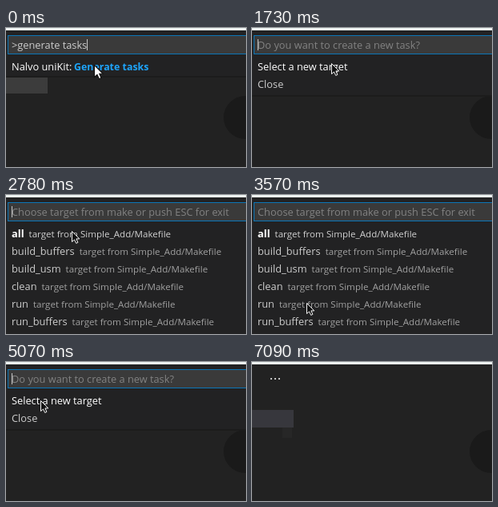
An HTML page with a canvas that plays this animation: 300 px wide and 174 px high, repeating every 7620 ms.

```html
<!DOCTYPE html>
<html lang="en">
<head>
<meta charset="utf-8">
<title>Command palette</title>
<style>
html, body { margin: 0; overflow: hidden; background: #222; }
canvas { display: block; }
</style>
</head>
<body>
<canvas id="stage" width="300" height="174"></canvas>
<script>
const ctx = document.getElementById('stage').getContext('2d');
const LOOP = 7620;
const TICK = 131;
const FONT = '"Open Sans", "Noto Sans", sans-serif';

// The caret toggles every `blink` ms; at `click` the given row takes the focus.
const scenes = [
  { start: 0, draw: command, blink: 270 },
  { start: 530, draw: question, blink: 573, click: 2520, row: 0 },
  { start: 2780, draw: targets, blink: 527 },
  { start: 4940, draw: question, blink: 670, click: 6680, row: 1 },
  { start: 6810, draw: closed },
];
const moves = [
  { start: 270, steps: 3, x: 109, y: 44 },
  { start: 1730, steps: 5, x: 82, y: 45 },
  { start: 3180, steps: 5, x: 65, y: 152 },
  { start: 3830, steps: 5, x: 43, y: 48 },
  { start: 5750, steps: 3, x: 40, y: 76 },
];
const POINTER_END = 6960;

const easeOut = p => 1 - (1 - p) ** 2;
const rowBase = i => 53 + 22 * i;

function rect(x, y, w, h, color) {
  ctx.fillStyle = color;
  ctx.fillRect(x, y, w, h);
}

// Draws a string and returns the x where it ends.
function text(str, x, y, color, size = 12.8, weight = 400) {
  ctx.font = `${weight} ${size}px ${FONT}`;
  ctx.fillStyle = color;
  ctx.fillText(str, x, y);
  return x + ctx.measureText(str).width;
}

function editor(tabColor) {
  rect(0, 0, 300, 174, '#222222');
  ctx.fillStyle = '#1a1a1a';
  ctx.beginPath();
  ctx.arc(299, 112, 27, 0, 7);
  ctx.fill();
  rect(0, 60, 52, 22, tabColor);
  rect(0, 0, 300, 3, '#eef6f4');
}

function closed(scene, t) {
  editor('#37373d');
  for (let i = 0; i < 3; i++) rect(23 + 5 * i, 20, 2, 2, '#c5c5c5');
  if (t >= POINTER_END) rect(38, 82, 12, 13, '#272727');
}

function palette(scene, t, bottom, value, color, caretX) {
  editor('#3c3c3c');
  rect(0, 3, 300, bottom - 3, '#222223');
  rect(0, bottom, 300, 2, '#1c1c1c');
  rect(2, 9, 300, 24, '#3a3a3a');
  text(value, 7, 26, color);
  if (t >= scene.click) {
    rect(0, 37 + 22 * scene.row, 300, 1, '#55606a');
    rect(0, 58 + 22 * scene.row, 300, 1, '#0b7cc0');
    return;
  }
  ctx.strokeStyle = '#0b76b8';
  ctx.lineWidth = 1;
  ctx.strokeRect(2.5, 9.5, 300, 23);
  const caretOn = Math.floor((t - scene.start) / scene.blink) % 2 === 0;
  if (caretOn) rect(caretX, 14, 1, 14, '#c8c8c8');
}

function command(scene, t) {
  palette(scene, t, 60, '>generate tasks', '#cccccc', 101);
  text('Nalvo uniKit:', 7, rowBase(0), '#ffffff');
  text('Generate tasks', 85, rowBase(0), '#1ea4fa', 12.4, 700);
}

function question(scene, t) {
  palette(scene, t, 84, 'Do you want to create a new task?', '#828282', 7);
  text('Select a new target', 7, rowBase(0), '#ffffff');
  text('Close', 7, rowBase(1), '#cccccc');
}

function targets(scene, t) {
  palette(scene, t, 174, 'Choose target from make or push ESC for exit', '#828282', 7);
  const names = ['all', 'build_buffers', 'build_usm', 'clean', 'run', 'run_buffers'];
  names.forEach((name, i) => {
    const y = rowBase(i);
    const end = text(name, 7, y, i ? '#cccccc' : '#ffffff', 12.8, i ? 400 : 700);
    text('target from Simple_Add/Makefile', end + 6, y, i ? '#a0a0a0' : '#d0d0d0', 11.6);
  });
}

// The pointer advances in whole ticks, easing out towards each goal.
function pointerAt(t) {
  let x = 110, y = 46;
  for (const move of moves) {
    if (t < move.start) break;
    const step = Math.floor((t - move.start) / TICK) + 1;
    const p = easeOut(Math.min(1, step / move.steps));
    x += (move.x - x) * p;
    y += (move.y - y) * p;
  }
  return [Math.round(x), Math.round(y)];
}

function drawPointer(t) {
  if (t >= POINTER_END) return;
  const [x, y] = pointerAt(t);
  const dark = t >= moves[0].start;
  const scale = dark ? 0.87 : 1;
  const arrow = new Path2D('M0 0V15L3.5 12L6 17.2L8.5 16L6.2 10.8H10.7Z');
  ctx.save();
  ctx.translate(x + 0.5, y + 0.5);
  ctx.scale(scale, scale);
  ctx.lineWidth = 1.1;
  ctx.fillStyle = dark ? '#111111' : '#ffffff';
  ctx.strokeStyle = dark ? '#ffffff' : '#111111';
  ctx.fill(arrow);
  ctx.stroke(arrow);
  ctx.restore();
}

function frame() {
  const t = performance.now() % LOOP;
  const scene = scenes.findLast(s => s.start <= t);
  scene.draw(scene, t);
  drawPointer(t);
  requestAnimationFrame(frame);
}
frame();
</script>
</body>
</html>
```
